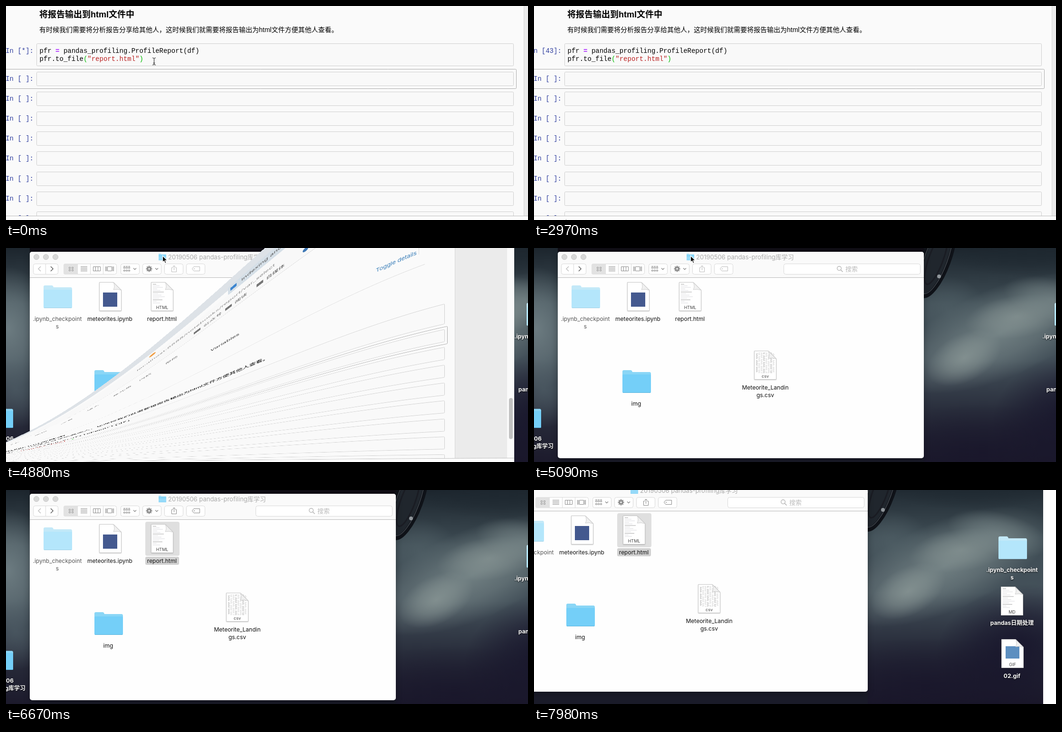
Recreate the animation shown at these times as an HTML page with a canvas. Size 1098 px wide and 452 px high, loop 8000 ms.

```html
<!DOCTYPE html>
<html lang="zh">
<head>
<meta charset="utf-8">
<title>将报告输出到html文件中</title>
<style>
html, body { margin: 0; width: 100%; height: 100%; overflow: hidden; background: #fff; }
canvas { display: block; }
</style>
</head>
<body>
<canvas id="stage" width="1098" height="452"></canvas>
<script>
const W = 1098, H = 452, LOOP = 8000;
const CHROME = 382, PAGE_W = 1214, DESK_W = 1189, DESK_H = 470;
const CJK = '"Noto Sans CJK SC", "Noto Sans CJK", sans-serif';
const UI = 'Inter, ' + CJK;
const BODY = '"Liberation Sans", ' + CJK;
const MONO = '14px "Liberation Mono", monospace';
const stage = document.getElementById('stage').getContext('2d');

function layer(w, h, paint) {
  const el = document.createElement('canvas');
  el.width = w;
  el.height = h;
  paint(el.getContext('2d'));
  return el;
}

function text(c, str, x, y, font, color, align = 'left') {
  c.font = font;
  c.fillStyle = color;
  c.textAlign = align;
  c.fillText(str, x, y);
}

function rect(c, x, y, w, h, color) {
  c.fillStyle = color;
  c.fillRect(x, y, w, h);
}

function box(c, x, y, w, h, r, fill, stroke) {
  c.beginPath();
  c.roundRect(x, y, w, h, r);
  if (fill) { c.fillStyle = fill; c.fill(); }
  if (stroke) { c.strokeStyle = stroke; c.lineWidth = 1; c.stroke(); }
}

function path(c, d, stroke, fill, width = 1) {
  const p = new Path2D(d);
  if (fill) { c.fillStyle = fill; c.fill(p); }
  if (stroke) { c.strokeStyle = stroke; c.lineWidth = width; c.stroke(p); }
}

function disc(c, x, y, r, fill, stroke) {
  c.beginPath();
  c.arc(x, y, r, 0, 7);
  c.fillStyle = fill;
  c.fill();
  if (stroke) { c.strokeStyle = stroke; c.lineWidth = 1; c.stroke(); }
}

// ---------- notebook page inside its browser window ----------
function browserTop(c) {
  rect(c, 0, -382, PAGE_W, 44, '#dde2e7');
  box(c, 612, -350, 190, 34, 4, '#d5dfe7');
  rect(c, 617, -340, 13, 13, '#3f86cf');
  text(c, 'Indexing and selecting data', 640, -329, '14px ' + UI, '#555');
  rect(c, 0, -316, PAGE_W, 78, '#f8f8f8');
  disc(c, 453, -322, 7, '#f0a04a');
  text(c, 'localhost:8888/notebooks/report/var_select', 420, -282, '14px ' + UI, '#888');
  ['公众号', '阅读', '自媒体'].forEach((name, i) => {
    const x = 540 + i * 66;
    box(c, x, -264, 14, 11, 1, '#777');
    text(c, name, x + 20, -254, '13px ' + UI, '#555');
  });
  disc(c, 775, -257, 6, '#3f78b5');
  rect(c, 0, -239, PAGE_W, 1, '#d0d0d0');
  ['文件', '编辑', '查看', '插入', '单元格', '内核', '帮助'].forEach((name, i) =>
    text(c, name, 150 + i * 55, -190, '13px ' + UI, '#777'));
  text(c, 'Variables', 575, -103, '14px ' + UI, '#333');
  text(c, 'Toggle details', 923, -62, '13px ' + UI, '#337ab7');
  rect(c, 1048, -238, 12, 170, '#e6e6e6');
  rect(c, 1013, -238, 1, 178, '#ddd');
  rect(c, 64, -31, 962, 1, '#d8d8d8');
}

function paintPage(c, count) {
  c.translate(0, CHROME);
  rect(c, 0, -CHROME, PAGE_W, CHROME + H, '#fafafa');
  browserTop(c);
  rect(c, 1090, -238, 109, 238 + H, '#ebebeb');
  rect(c, 1089, -238, 1, 238 + H, '#d6d6d6');
  rect(c, 1199, -238, 15, 238 + H, '#fafafa');
  box(c, 1203, 313, 8, 89, 4, '#c1c1c1');

  text(c, '将报告输出到html文件中', 70, 24, 'bold 18px ' + BODY, '#000');
  text(c, '有时候我们需要将分析报告分享给其他人，这时候我们就需要将报告输出为html文件方便其他人查看。',
    70, 55, '14px ' + BODY, '#000');

  const prompt = (s, y) => text(c, s, 58, y, MONO, '#303f9f', 'right');
  const cell = (y, h) => box(c, 64.5, y + .5, 1003, h, 2, '#f9f9f9', '#cfcfcf');
  cell(79, 47);
  prompt(`In [${count}]:`, 99);
  const code = (s, col, y, color, bold = '') =>
    text(c, s, 70.5 + col * 8.4, y, bold + MONO, color);
  code('pfr', 0, 99, '#000');
  code('=', 4, 99, '#a2f', 'bold ');
  code('pandas_profiling.ProfileReport(df)', 6, 99, '#000');
  code('pfr.to_file', 0, 116, '#000');
  code('(', 11, 116, '#0b0');
  code('"report.html"', 12, 116, '#ba2121');
  code(')', 25, 116, '#0b0');

  box(c, -9.5, 133.5, 1083, 41, 2, '#fafafa', '#ababab');
  for (let i = 0; i < 8; i++) {
    const y = Math.floor(139 + i * 42.2);
    cell(y, 29);
    prompt('In [ ]:', y + 19);
  }
  rect(c, 0, 443, PAGE_W, 9, '#fcfcfc');
  rect(c, 0, 443, PAGE_W, 1, '#bdbdbd');
  rect(c, 67, 450, 1, 2, '#aaa');
}

// ---------- desktop ----------
function glow(c, x, y, rx, ry, rgb, alpha, tilt = 0) {
  c.save();
  c.translate(x, y);
  c.rotate(tilt);
  c.scale(rx, ry);
  const g = c.createRadialGradient(0, 0, 0, 0, 0, 1);
  g.addColorStop(0, `rgba(${rgb},${alpha})`);
  g.addColorStop(.5, `rgba(${rgb},${alpha * .6})`);
  g.addColorStop(1, `rgba(${rgb},0)`);
  c.fillStyle = g;
  c.fillRect(-1, -1, 2, 2);
  c.restore();
}

function folder(c, x, y, w, h, pale) {
  const k = w / 60, front = pale ? '#b4e6fb' : '#74cff8', back = pale ? '#c3e9f8' : '#8ad6f6';
  c.save();
  c.translate(x, y);
  c.scale(k, h / 48);
  path(c, 'M0 3Q0 0 3 0H17Q20 0 21 4H57Q60 4 60 8V20H0Z', null, back);
  box(c, 0, 9, 60, 39, 2, front);
  rect(c, 1, 47, 58, 1, pale ? '#9fcfe4' : '#58b3dc');
  c.restore();
}

function doc(c, x, y, kind) {
  c.save();
  c.translate(x, y);
  c.shadowColor = 'rgba(0,0,0,.3)';
  c.shadowBlur = 2;
  c.shadowOffsetY = 1;
  path(c, 'M.5 .5H30L46.5 17V60.5H.5Z', null, '#fff');
  c.shadowColor = 'transparent';
  if (kind === 'HTML' || kind === 'MD')
    for (let i = 0; i < 13; i++) rect(c, 4, 4 + i * 3.3, 7 + (i * 7) % 19, 1, i % 5 ? '#dcdce0' : '#aaa');
  if (kind === 'csv')
    for (let i = 0; i < 8; i++)
      for (let j = 0; j < 22; j++)
        if ((i * 5 + j * 3) % 7) rect(c, 4 + i * 5, 4 + j * 2, 3 + (i + j) % 2, 1, i % 3 ? '#d8d8d8' : '#bbb');
  if (kind === 'ipynb') rect(c, 8, 22, 30, 30, '#44598f');
  if (kind === 'GIF') rect(c, 9, 15, 29, 26, '#5d8fc0');
  path(c, 'M30 .5Q34 9 30 16Q38 14 46.5 17Z', '#cfcfcf', '#f0f0f0');
  path(c, 'M.5 .5H30L46.5 17V60.5H.5Z', '#c6c6c6');
  if (kind !== 'ipynb') text(c, kind, 23.5, 57, '9px ' + UI, '#444', 'center');
  c.restore();
}

function paintDesk(c) {
  const g = c.createLinearGradient(0, 0, 0, DESK_H);
  [[0, '#1c252d'], [.25, '#3f4d55'], [.5, '#44515a'], [.72, '#2a2f3d'], [1, '#1a1729']]
    .forEach(s => g.addColorStop(...s));
  c.fillStyle = g;
  c.fillRect(0, 0, DESK_W, DESK_H);
  // mist over the road, brightest along a rising diagonal
  glow(c, 980, 180, 240, 95, '128,143,144', .75, -.4);
  glow(c, 905, 232, 85, 50, '150,163,160', .6, -.5);
  glow(c, 1015, 145, 110, 45, '150,163,160', .5, -.15);
  glow(c, 1095, 110, 110, 45, '128,143,144', .55, .25);
  glow(c, 870, 130, 80, 70, '88,104,110', .5);
  // darker ground and sky
  glow(c, 1130, 350, 170, 130, '22,19,42', .85, -.3);
  glow(c, 940, 430, 270, 100, '24,21,42', .75);
  glow(c, 1040, 10, 190, 50, '30,40,48', .7);
  // left strip
  glow(c, 5, 170, 90, 130, '126,142,146', .7);
  glow(c, 20, 300, 80, 80, '86,102,110', .6);
  rect(c, 50, 0, 770, 8, '#0f0d14');
  rect(c, 50, 444, 770, 26, '#1a1b29');
  c.save();
  c.translate(846, 22);
  c.rotate(.35);
  for (const [rx, ry, w, color] of [[27, 84, 9, '#0f1218'], [24, 79, 1, '#565c63'], [15, 58, 3, '#1a1c23']]) {
    c.beginPath();
    c.ellipse(0, 0, rx, ry, 0, 0, 7);
    c.fillStyle = '#20262d';
    if (w > 5) c.fill();
    c.strokeStyle = color;
    c.lineWidth = w;
    c.stroke();
  }
  c.restore();
  disc(c, 852, 60, 4, '#8f959a');

  folder(c, -45, 336, 60, 44);
  folder(c, 1095, 116, 60, 48, true);
  doc(c, 1100, 222, 'MD');
  doc(c, 1101, 333, 'GIF');
  c.shadowColor = '#000';
  c.shadowBlur = 3;
  c.shadowOffsetY = 1;
  const label = (s, x, y, align = 'center') => text(c, s, x, y, 'bold 12px ' + UI, '#fff', align);
  label('20190506', 16, 407, 'right');
  label('pandas-profiling库学习', 41, 423, 'right');
  label('.ipynb_checkpoint', 1123.5, 191);
  label('s', 1123.5, 207);
  label('pandas日期处理', 1123.5, 303);
  label('02.gif', 1123.5, 415);
}

// ---------- file window ----------
function toolbar(c, active, selected) {
  const line = active ? '#c9c7c9' : '#d9d9d9';
  const ink = active ? '#555' : '#8c8c8c', faint = '#bbb';
  const shareInk = selected ? (active ? '#555' : '#888') : faint;
  const button = (x, w) => box(c, x + .5, 33.5, w, 22, 4, '#fff', line);
  [[57, 52], [121, 111], [241, 39], [287, 39], [333, 39], [379, 39], [525, 287]].forEach(b => button(...b));
  [83, 150, 177, 204].forEach(x => rect(c, x, 34, 1, 21, line));
  box(c, 121, 33, 29.5, 23, [4, 0, 0, 4], active ? '#6c6a6c' : '#e2e2e2');
  path(c, 'M73 39L68 44L73 49', faint, null, 1.4);
  path(c, 'M94 39L99 44L94 49', '#555', null, 1.4);
  const tile = active ? '#fff' : '#999';
  for (const x of [132, 138]) for (const y of [40, 45]) box(c, x + .5, y + .5, 3, 3, .5, null, tile);
  for (let i = 0; i < 4; i++) rect(c, 157, 39 + i * 3, 14, 1, ink);
  path(c, 'M183.5 39.5H198.5V48.5H183.5ZM188.5 39.5V48.5M193.5 39.5V48.5', ink);
  path(c, 'M213.5 39.5H222.5V48.5H213.5ZM209.5 39V49M211.5 39V49M224.5 39V49M226.5 39V49', ink);
  for (let i = 0; i < 3; i++) {
    box(c, 247.5 + i * 5, 40.5, 3, 2.5, 0, null, ink);
    box(c, 247.5 + i * 5, 46.5, 3, 2.5, 0, null, ink);
    rect(c, 247 + i * 5, 38, 4, 1, ink);
  }
  for (const x of [268, 314]) path(c, `M${x} 42.5L${x + 3} 45.5L${x + 6} 42.5`, ink, null, 1.3);
  c.save();
  c.translate(301, 44);
  for (let i = 0; i < 4; i++) { rect(c, -1.3, -6.5, 2.6, 13, ink); c.rotate(Math.PI / 4); }
  disc(c, 0, 0, 4.6, ink);
  disc(c, 0, 0, 1.7, '#fff');
  c.restore();
  path(c, 'M351 41.5H348.5V50.5H358.5V41.5H356M353.5 47V37M350.5 40L353.5 37L356.5 40', shareInk);
  path(c, 'M391.5 44L395 39.5H407.5V48.5H395Z', shareInk);
  disc(c, 396, 44, 1, shareInk);
  c.beginPath();
  c.arc(642, 43, 4.3, 0, 7);
  c.strokeStyle = active ? '#777' : '#aaa';
  c.lineWidth = 1.2;
  c.stroke();
  path(c, 'M645 46L649.5 50.5', active ? '#777' : '#aaa', null, 1.3);
  text(c, '搜索', 655, 49, '13px ' + UI, active ? '#999' : '#bbb');
}

function paintWindow(c, active, selected) {
  c.save();
  c.shadowColor = active ? 'rgba(0,0,0,.5)' : 'rgba(0,0,0,.3)';
  c.shadowBlur = active ? 34 : 14;
  c.shadowOffsetY = active ? 12 : 4;
  box(c, 50, 8, 770, 436, 5, '#fefefe');
  c.restore();
  const bar = c.createLinearGradient(0, 8, 0, 62);
  bar.addColorStop(0, active ? '#e9e7e9' : '#fafafa');
  bar.addColorStop(1, active ? '#d2d0d2' : '#fafafa');
  box(c, 50, 8, 770, 54, [5, 5, 0, 0], bar);
  rect(c, 50, 62, 770, 1, active ? '#b3b1b3' : '#b9b9b9');
  ['#fb5a55', '#fcbc3c', '#34c648'].forEach((color, i) =>
    disc(c, 64 + i * 20, 19, 5.6, active ? color : '#d8d8d8', active ? 'rgba(0,0,0,.12)' : '#c9c9c9'));
  c.globalAlpha = active ? 1 : .75;
  folder(c, 321, 12, 16, 14);
  c.globalAlpha = 1;
  text(c, '20190506 pandas-profiling库学习', 341, 24, '13px ' + UI, active ? '#444' : '#aaa');
  toolbar(c, active, selected);

  if (selected) {
    box(c, 293, 67, 72, 72, 4, '#dfdfdf');
    box(c, 293, 141, 71, 17, 3, active ? '#0b5fd6' : '#d1d1d1');
  }
  folder(c, 79, 79, 60, 48, true);
  folder(c, 186, 258, 60, 48);
  doc(c, 196, 72, 'ipynb');
  doc(c, 305, 72, 'HTML');
  doc(c, 463, 217, 'csv');
  const label = (s, x, y, color = '#111') => text(c, s, x, y, '12px ' + UI, color, 'center');
  label('.ipynb_checkpoint', 108, 154, '#555');
  label('s', 108, 170, '#555');
  label('meteorites.ipynb', 218.5, 154);
  label('report.html', 328, 154, selected && active ? '#fff' : '#111');
  label('img', 215, 333);
  label('Meteorite_Landin', 486.5, 299);
  label('gs.csv', 486.5, 315);
}

// ---------- pointer ----------
function pointer(c, x, y, beam) {
  c.save();
  c.translate(x, y);
  if (beam) {
    const d = 'M-3.5 -7.5Q0 -7.5 0 -5V5Q0 7.5 -3.5 7.5M3.5 -7.5Q0 -7.5 0 -5V5Q0 7.5 3.5 7.5M-2 3.5H2';
    path(c, d, '#fff', null, 2.4);
    path(c, d, '#222', null, 1.1);
  } else {
    path(c, 'M.5 .5V14L3.6 11.2L5.8 16.2L8 15.2L5.9 10.3H10.2Z', '#fff', '#000', 1.2);
  }
  c.restore();
}

// ---------- timeline ----------
const pointerKeys = [
  [0, 311.5, 117, 1], [60, 352, 117, 1], [180, 373.5, 117, 1], [770, 375, 98, 1], [830, 369, 66],
  [1190, 371, 67], [1250, 374, 70], [1310, 376, 72], [1850, 373, 64], [1900, 367, 52], [1960, 364, 47],
  [2130, 332, 30], [2190, 289, 10], [2250], [4880, 329, 16], [5360, 329, 40], [5460, 329, 85],
  [5580, 329, 106], [6200, 318, 90], [6290, 298, 55], [6380, 279, 31], [6560, 266, 16], [6610, 255, 2],
  [6670], [7620, 259, 17], [7740, 357, 145], [7930]
];
// time, strength of the funnel, slide to the left
const funnelKeys = [[0, 0, 0], [4710, .06, 0], [4760, .4, 20], [4880, 1, 145], [4970, 1, 700], [5090]];
const cameraKeys = [[0, 0, 0], [7930, -59, -9], [7980, -118, -18]];
const at = (keys, t) => keys.findLast(k => k[0] <= t);

const running = layer(PAGE_W, CHROME + H, c => paintPage(c, '*'));
const done = layer(PAGE_W, CHROME + H, c => paintPage(c, '43'));
const desk = layer(DESK_W, DESK_H, paintDesk);

function funnel(x) {
  const u = Math.min(1, Math.max(0, (x + 190) / 1390));
  return u * u * (3 - 2 * u);
}

function drawPage(page, amount, slide) {
  if (!amount) {
    stage.drawImage(page, 0, -CHROME);
    return;
  }
  const full = CHROME + H;
  for (let x = 0; x < W && x + slide < PAGE_W; x++) {
    const h = full * (1 + (funnel(x) - 1) * amount);
    stage.drawImage(page, x + slide, 0, 1, full, x, H - h, 1, h);
  }
}

function draw(t) {
  const [, amount, slide] = at(funnelKeys, t);
  const [, px, py, beam] = at(pointerKeys, t);
  const [, cx, cy] = at(cameraKeys, t);
  rect(stage, 0, 0, W, H, '#fff');
  stage.save();
  stage.translate(cx, cy);
  if (t >= 4710) {
    stage.drawImage(desk, 0, 0);
    stage.save();
    stage.beginPath();
    stage.rect(0, 0, DESK_W, DESK_H);
    stage.clip();
    paintWindow(stage, t >= 5240 && t < 6200, t >= 5910);
    stage.restore();
  }
  if (amount !== undefined) drawPage(t < 2970 ? running : done, amount, slide);
  if (px !== undefined) pointer(stage, px, py, beam);
  stage.restore();
}

const start = performance.now();
function tick() {
  draw((performance.now() - start) % LOOP);
  requestAnimationFrame(tick);
}
tick();
</script>
</body>
</html>
```
